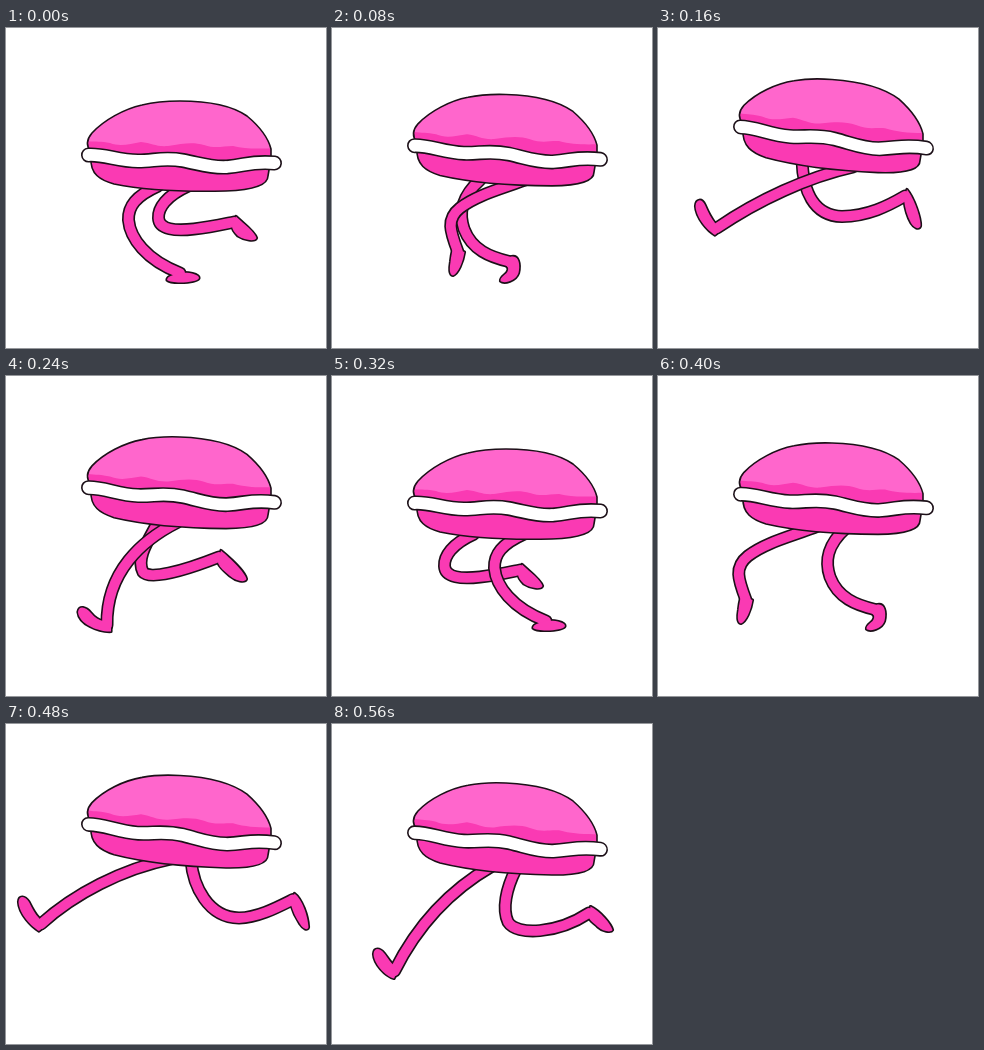
An HTML page with a canvas for the animation above (640 ms loop, 320x320 px).

```html
<!DOCTYPE html>
<html lang="en">
<head>
<meta charset="utf-8">
<title>Running macaron</title>
<style>
html, body { margin: 0; width: 100%; height: 100%; overflow: hidden; background: #fff; }
canvas { display: block; width: 100vw; height: 100vh; }
</style>
</head>
<body>
<canvas width="320" height="320"></canvas>
<script>
const ctx = document.querySelector('canvas').getContext('2d');
const STEP = 80;
const INK = '#1c1018', PINK = '#fa3ab3', LIGHT = '#ff66cc', CREAM = '#fff';
const LINE = 1.6, LEG = 13, FILLING = 15;

const dome = new Path2D('M85 124 C80 118 80 112 86 105 C98 92 118 81 136 77 C148 74 160 73 174 73 C205 73 228 79 241 88 C253 98 262 109 265 121 V137 L215 139 L150 131 Z');
const shade = new Path2D('M78 113 C90 114 94 113 104 115 C114 119 124 116 135 114 C146 115 150 119 162 118 C178 115 188 114 198 117 C210 121 216 118 227 118 C240 121 250 121 268 120 V145 H78 Z');
const base = new Path2D('M85 130 C84 146 94 152 108 156 C138 162 182 164 220 163 C246 162 262 157 262 148 L264 136 Z');
const filling = new Path2D('M82.5 127 C98 126 112 133 132 133 C148 133 158 129 177 132.5 C195 136 205 140 221 139 C241 137 246 133 268.5 135');

// A leg is a centre line plus a closed foot outline, optionally shifted sideways.
const leg = (line, foot) => ({ line: new Path2D(line), foot: new Path2D(foot), dx: 0 });
const shift = (pose, dx) => ({ ...pose, dx });

const planted = leg('M152 158 C130 168 122 178 122.5 192 C124 210 140 232 174 245',
  'M161 252 C161 248 168 247 174 245 C182 244 193 246 193 250 C192 255 165 256 161 252Z');
const passing = leg('M182 158 C160 168 152 180 152.5 190 C153 202 170 203 188 201 C205 199 218 196 228 194',
  'M230 188.5 C238 196 249 204 250.5 210 C249 214 238 212 232 208 C228 204 226 201 226 198Z');
const reaching = leg('M160 150 C135 160 108 166 90 180 C76 191 80 203 88 224',
  'M94.5 224 C93 234 88 246 83 247.5 C79 247 79.5 240 80.5 234 C81 229 82 224 83 220Z');
const pushing = leg('M188 152 C168 170 167 186 172 201 C180 222 198 229 217 233.5',
  'M218 229 C227 226 228.5 237 226.5 245 C224 253 212 256 208.5 253 C208 248 215 247 216 242 C217 239 214 238 213 236Z');

// Far and near leg, with the vertical offset and tilt of the body.
const poses = [
  { far: planted, near: passing, y: 0, tilt: 0 },
  { far: shift(pushing, -40), near: shift(reaching, 38), y: -6.5, tilt: .03 },
  {
    far: leg('M144 132 C145 162 155 188 184 188.5 C210 188 230 178 247 168',
      'M249 161.5 C256 170 263 190 262.5 198 C261 202 256 200 253 195 C249 188 247 180 246 172Z'),
    near: leg('M195 139 C150 149 100 172 59 200',
      'M57 207 C50 203 38 190 37.5 178 C38 171 44 170 47 177 C50 184 53 190 57 195 L62 203Z'),
    y: -21.5, tilt: .07
  },
  {
    far: leg('M152 146 C142 165 130 182 137 196 C143 204 175 196 213 181',
      'M215 174.5 C224 182 239 196 240.5 203 C239 207 230 205 224 200 C218 195 214 192 212 187Z'),
    near: leg('M172 146 C136 164 100 196 101 249',
      'M105 255.5 C92 256 73 248 72 236 C73 229 80 231 85 237 C89 242 93 244 97 245 L105 245Z'),
    y: -12, tilt: .035
  },
  { far: shift(passing, -40), near: shift(planted, 40), y: 0, tilt: 0 },
  { far: reaching, near: pushing, y: -6, tilt: .03 },
  {
    far: leg('M165 135 C116 145 68 170 35 200',
      'M33 207 C26 203 13 190 12.5 178 C13 171 19 172 23 178 C26 184 29 190 33 194 L38 203Z'),
    near: leg('M185 136 C187 162 202 193.5 233 194 C252 193.5 270 184 287 175.5',
      'M288.5 169.5 C296 175 302 192 302.5 203 C302 207 297 205 294 200 C290 194 287 188 285 181Z'),
    y: -21.5, tilt: .055
  },
  {
    far: leg('M160 142 C120 165 86 200 62.5 247',
      'M62 254.5 C53 252 42 240 41.5 230 C42 223 48 224 52 229 C56 234 59 239 61.5 241 L66 246Z'),
    near: leg('M184 145 C174 165 170 185 176 198 C185 212 225 210 257 189',
      'M258.5 182.5 C268 187 279 200 280.5 206 C279 209 270 207 266 203 C262 199 259 198 257 194Z'),
    y: -14, tilt: .045
  }
];

function stroke(path, color, width) {
  ctx.strokeStyle = color;
  ctx.lineWidth = width;
  ctx.stroke(path);
}

function fill(path, color) {
  ctx.fillStyle = color;
  ctx.fill(path);
}

function drawLeg({ line, foot, dx }) {
  ctx.save();
  ctx.translate(dx, 0);
  stroke(line, INK, LEG);
  stroke(foot, INK, LINE * 2);
  stroke(line, PINK, LEG - LINE * 2);
  fill(foot, PINK);
  ctx.restore();
}

function drawBody(y, tilt) {
  ctx.save();
  ctx.transform(1, tilt, 0, 1, 0, y - tilt * 175);
  fill(base, PINK);
  stroke(base, INK, LINE);
  fill(dome, LIGHT);
  ctx.save();
  ctx.clip(dome);
  fill(shade, PINK);
  ctx.restore();
  stroke(dome, INK, LINE);
  stroke(filling, INK, FILLING);
  stroke(filling, CREAM, FILLING - LINE * 2);
  ctx.restore();
}

function draw() {
  const pose = poses[Math.floor(performance.now() / STEP) % poses.length];
  ctx.fillStyle = '#fff';
  ctx.fillRect(0, 0, 320, 320);
  ctx.lineJoin = ctx.lineCap = 'round';
  drawLeg(pose.far);
  drawLeg(pose.near);
  drawBody(pose.y, pose.tilt);
  requestAnimationFrame(draw);
}
draw();
</script>
</body>
</html>
```
